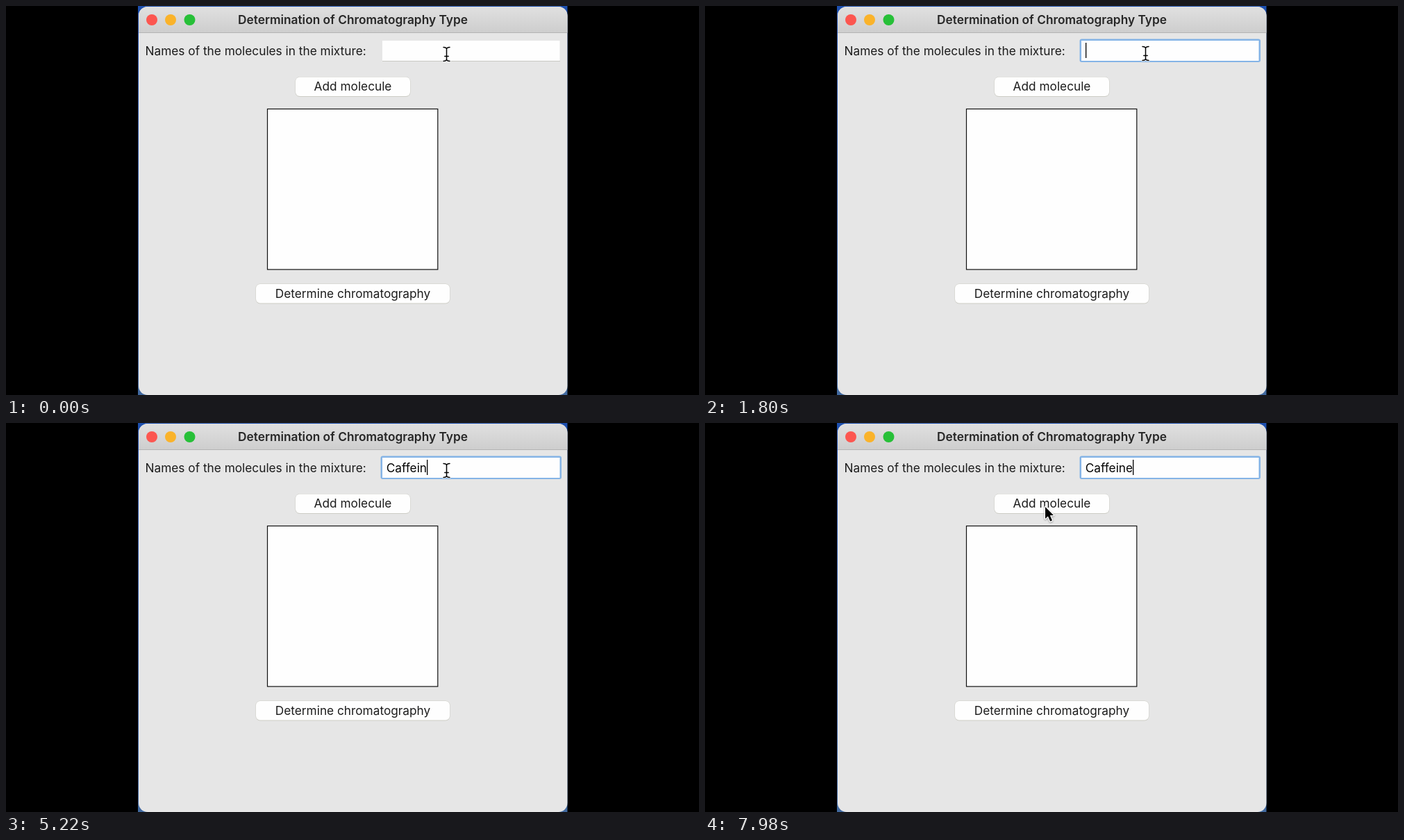
Animation of 998x561 px, one loop 8000 ms. Source, as an HTML page with a canvas:

```html
<!DOCTYPE html>
<html lang="en">
<head>
<meta charset="utf-8">
<title>Determination of Chromatography Type</title>
<style>
  html, body { margin: 0; width: 100%; height: 100%; overflow: hidden; background: #000; }
  canvas { display: block; }
</style>
</head>
<body>
<canvas id="stage" width="998" height="561"></canvas>
<script>
const ctx = document.getElementById('stage').getContext('2d');
const LOOP = 8000;
const FOCUS = 540;
const FAMILY = 'Inter, "Open Sans", sans-serif';
const WORD = 'Caffeine';
const KEYS = [2720, 3500, 3960, 4160, 4420, 4800, 5000, 5240];

// time, x, y of the pointer hot spot
const PATH = [
  [0, 634.5, 69.5], [400, 634.5, 69.5], [520, 634.5, 68.5], [5620, 634.5, 68.5],
  [6020, 663.5, 66.5], [6760, 663.5, 66.5], [7120, 511, 126], [7580, 511, 126],
  [7960, 489, 120], [LOOP, 489, 120]
];

function pointerAt(t) {
  let i = 1;
  while (PATH[i][0] < t) i++;
  const [t0, x0, y0] = PATH[i - 1], [t1, x1, y1] = PATH[i];
  const p = (t - t0) / (t1 - t0), e = p * p * (3 - 2 * p);
  return [x0 + (x1 - x0) * e, y0 + (y1 - y0) * e];
}

function box(x, y, w, h, r, fill) {
  ctx.beginPath();
  ctx.roundRect(x, y, w, h, r);
  ctx.fillStyle = fill;
  ctx.fill();
}

function fade(y0, y1, from, to) {
  const g = ctx.createLinearGradient(0, y0, 0, y1);
  g.addColorStop(0, from);
  g.addColorStop(1, to);
  return g;
}

function text(s, x, y, { size = 17.25, weight = 400, align = 'left', color = '#1c1c1c' } = {}) {
  ctx.font = `${weight} ${size}px ${FAMILY}`;
  ctx.textAlign = align;
  ctx.fillStyle = color;
  ctx.fillText(s, x, y);
}

function button(label, x, y, w) {
  box(x - 0.5, y, w + 1, 29, 6.5, '#cdcdc6');
  box(x, y + 0.5, w, 27.5, 6, '#fefefe');
  text(label, x + w / 2, y + 20, { align: 'center' });
}

function drawWindow() {
  ctx.fillStyle = '#000';
  ctx.fillRect(0, 0, 998, 561);
  ctx.fillStyle = fade(0, 561, '#1d4fae', '#41699f');
  ctx.fillRect(190, 0, 618.5, 561);

  ctx.save();
  ctx.beginPath();
  ctx.roundRect(191, 1, 617.5, 560, 13);
  ctx.clip();
  ctx.fillStyle = '#e6e6e6';
  ctx.fillRect(190, 0, 620, 561);
  ctx.fillStyle = fade(1, 38, '#e0e0e0', '#cecece');
  ctx.fillRect(190, 0, 620, 38);
  ctx.fillStyle = '#b4b4b4';
  ctx.fillRect(190, 38, 620, 1);
  ctx.restore();

  [[210, '#fc5650'], [237, '#fab32a'], [264.5, '#27c038']].forEach(([x, color]) =>
    box(x - 8, 12, 16, 16, 8, color));
  text('Determination of Chromatography Type', 499.5, 26,
    { size: 17.3, weight: 600, align: 'center', color: '#262626' });
  text('Names of the molecules in the mixture:', 200.5, 70.5);

  button('Add molecule', 417, 102, 165);
  button('Determine chromatography', 360, 400.5, 279);

  ctx.fillStyle = '#fefefe';
  ctx.fillRect(376, 148, 246, 232);
  ctx.strokeStyle = '#111';
  ctx.lineWidth = 1.2;
  ctx.strokeRect(376.5, 148.5, 245.3, 231.5);
}

function drawField(t) {
  if (t >= FOCUS) box(539.5, 47.5, 260.5, 33.5, 3, '#85b4e6');
  else {
    ctx.fillStyle = '#c9c9c4';
    ctx.fillRect(542, 79, 256, 1);
  }
  ctx.fillStyle = '#fefefe';
  ctx.fillRect(542, 50, 255.5, 29);

  const typed = WORD.slice(0, KEYS.filter(k => k <= t).length);
  text(typed, 547.7, 70.5, { color: '#050505' });
  // caret: 600 ms on, 300 ms off
  if (t >= FOCUS && (t - FOCUS) % 900 < 600) {
    ctx.fillStyle = '#000';
    ctx.fillRect(Math.round(547.7 + ctx.measureText(typed).width), 53, 1.3, 22);
  }
}

function drawBeam(x, y) {
  ctx.beginPath();
  for (const s of [-1, 1]) {
    ctx.moveTo(x - 4.5, y + 10 * s);
    ctx.quadraticCurveTo(x, y + 10 * s, x, y + 7 * s);
    ctx.quadraticCurveTo(x, y + 10 * s, x + 4.5, y + 10 * s);
  }
  ctx.moveTo(x, y - 8);
  ctx.lineTo(x, y + 8);
  ctx.moveTo(x - 2.7, y + 3);
  ctx.lineTo(x + 2.7, y + 3);
  ctx.lineCap = 'round';
  ctx.strokeStyle = '#fff';
  ctx.lineWidth = 3.2;
  ctx.stroke();
  ctx.strokeStyle = '#000';
  ctx.lineWidth = 1.5;
  ctx.stroke();
}

function drawArrow(x, y) {
  ctx.save();
  ctx.translate(x + 1, y + 1);
  ctx.beginPath();
  ctx.moveTo(0, 0);
  [[0, 17], [3.9, 13.4], [7.2, 20.8], [10, 19.5], [6.8, 12.3], [12, 12]]
    .forEach(p => ctx.lineTo(...p));
  ctx.closePath();
  ctx.lineJoin = 'round';
  ctx.strokeStyle = '#fff';
  ctx.lineWidth = 2.6;
  ctx.shadowColor = 'rgba(0,0,0,.35)';
  ctx.shadowBlur = 2.5;
  ctx.shadowOffsetY = 1;
  ctx.stroke();
  ctx.shadowColor = 'transparent';
  ctx.fillStyle = '#000';
  ctx.fill();
  ctx.restore();
}

function frame() {
  const t = performance.now() % LOOP;
  drawWindow();
  drawField(t);
  const [x, y] = pointerAt(t);
  (y < 80 ? drawBeam : drawArrow)(x, y);
  requestAnimationFrame(frame);
}
frame();
</script>
</body>
</html>
```
